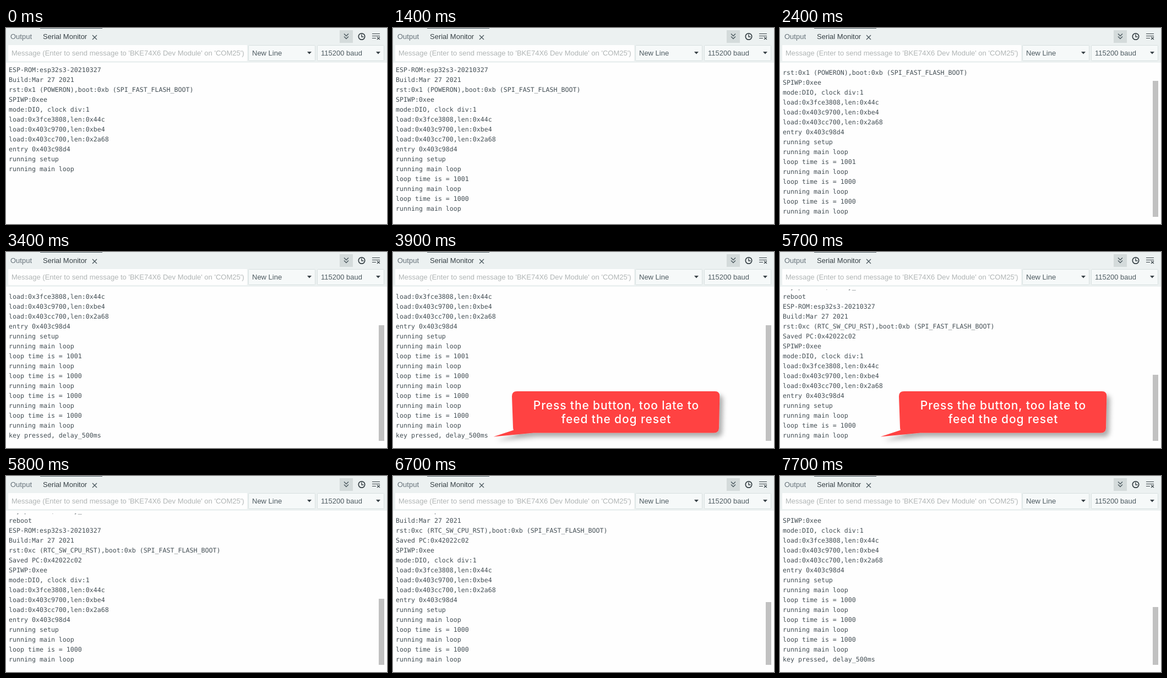
An HTML page for the animation above (8 s loop, 692 by 356 pixels).

```html
<!DOCTYPE html>
<html lang="en">
<head>
<meta charset="utf-8">
<title>Serial Monitor</title>
<style>
  html, body { margin: 0; width: 100%; height: 100%; overflow: hidden; background: #fefefe; }
  svg { display: block; width: 692px; height: 356px; }
  .ui { font: 13px "Liberation Sans", Arial, sans-serif; fill: #4e5b61; }
  .log { font: 11.627px "DejaVu Sans Mono", "Liberation Mono", monospace; fill: #444f55;
         text-rendering: geometricPrecision; white-space: pre; }
  .callout { font: 500 21px Inter, "Open Sans", sans-serif; letter-spacing: .88px;
             fill: #fff; text-anchor: middle; }
  .icon { fill: none; stroke: #4e5b61; stroke-width: 1.4; }
  .dark { stroke: #374146; }
</style>
</head>
<body>
<svg viewBox="0 0 692 356">
  <defs>
    <clipPath id="view"><rect x="0" y="68" width="692" height="275"/></clipPath>
    <filter id="shadow" x="-10%" y="-20%" width="125%" height="160%">
      <feDropShadow dx="6" dy="7" stdDeviation="4.5" flood-color="#000" flood-opacity=".32"/>
    </filter>
  </defs>

  <rect width="692" height="356" fill="#fefefe"/>
  <rect width="692" height="63" fill="#ecf1f1"/>

  <g class="ui">
    <rect x="62" width="113" height="1" fill="#4e5b61"/>
    <text x="8" y="20" fill="#66727a">Output</text>
    <text x="67" y="20" fill="#374146">Serial Monitor</text>
    <path class="icon" d="M157 13l8 8m0-8l-8 8"/>

    <rect x="606" y="4" width="24" height="23" fill="#d4dbdb"/>
    <path class="icon" d="M614 10.5l4 4 4-4M614 15.5l4 4 4-4"/>
    <circle class="icon dark" cx="646" cy="15.500" r="5.700" stroke-width="1.700" style="stroke-width:1.7"/>
    <path class="icon dark" d="M646 11.500v4.500h3.500"/>
    <path class="icon dark" d="M665 10.500h14M665 14.500h14M665 18.500h7M674 16.500l5 4.500m0-4.500l-5 4.500" style="stroke-width:1.1"/>

    <rect x="4" y="31" width="434" height="29" rx="1" fill="#fefefe"/>
    <text x="10" y="50" fill="#b0b5b5">Message (Enter to send message to 'BKE74X6 Dev Module' on 'COM25')</text>
    <g fill="#f6f9f9" stroke="#d8e0e0">
      <rect x="440.5" y="31.5" width="121" height="28" rx="1"/>
      <rect x="565.5" y="31.5" width="121" height="28" rx="1"/>
    </g>
    <text x="447" y="50">New Line</text>
    <text x="572" y="50">115200 baud</text>
    <path d="M547 43h8l-4 4.500zM672 43h8l-4 4.500z" fill="#3a4348"/>
  </g>

  <g clip-path="url(#view)"><g id="log" class="log"></g></g>
  <rect id="thumb" x="677" width="10" fill="#c1c1c1"/>

  <g id="callout">
    <path filter="url(#shadow)" fill="#ff4343"
      d="M225 253H585Q593.500 253 593.300 262L592 320Q591.500 328.500 583 328.500H255L182.500 335.500L219 323.500Q218 321 218 318L216 262Q216 253 225 253Z"/>
    <text class="callout" x="405.5" y="286">Press the button, too late to</text>
    <text class="callout" x="405.5" y="310.5">feed the dog reset</text>
  </g>
</svg>
<script>
const DURATION = 8000, LINE = 18, VIEW_TOP = 68, VIEW_HEIGHT = 275, FIRST_BASELINE = 80;
const RUN = "running main loop", KEY = "key pressed, delay_500ms";
const $ = id => document.getElementById(id);

const boot = (...reset) => [
  "ESP-ROM:esp32s3-20210327", "Build:Mar 27 2021", ...reset, "SPIWP:0xee",
  "mode:DIO, clock div:1", "load:0x3fce3808,len:0x44c", "load:0x403c9700,len:0xbe4",
  "load:0x403cc700,len:0x2a68", "entry 0x403c98d4", "running setup", RUN
];
const loops = (...times) => times.flatMap(ms => ["loop time is = " + ms, RUN]);

const lines = [
  ...boot("rst:0x1 (POWERON),boot:0xb (SPI_FAST_FLASH_BOOT)"),
  ...loops(1001, 1000, 1000, 1000), KEY, "reboot",
  ...boot("rst:0xc (RTC_SW_CPU_RST),boot:0xb (SPI_FAST_FLASH_BOOT)", "Saved PC:0x42022c02"),
  ...loops(1000, 1000, 1000), KEY
];

// [time in ms, number of lines printed so far]
const prints = [[0, 11], [300, 12], [400, 13], [1400, 15], [2400, 17], [3400, 20],
                [4600, 31], [4700, 33], [5700, 35], [6700, 37], [7700, 40]];

const rows = lines.map((line, i) => {
  const row = document.createElementNS("http://www.w3.org/2000/svg", "text");
  row.setAttribute("x", 5);
  row.setAttribute("y", FIRST_BASELINE + i * LINE);
  row.textContent = line;
  return $("log").appendChild(row);
});

const show = (node, visible) => node.setAttribute("visibility", visible ? "visible" : "hidden");

function render(time) {
  const count = prints.filter(([start]) => start <= time).pop()[1];
  const height = count * LINE;
  const scroll = Math.max(0, height - VIEW_HEIGHT);
  rows.forEach((row, i) => show(row, i < count));
  $("log").setAttribute("transform", `translate(0 ${-scroll})`);

  const thumbHeight = Math.round(VIEW_HEIGHT * VIEW_HEIGHT / height);
  show($("thumb"), scroll > 0);
  $("thumb").setAttribute("y", VIEW_TOP + VIEW_HEIGHT - thumbHeight);
  $("thumb").setAttribute("height", thumbHeight);

  show($("callout"), time >= 3900 && time < 5800);
}

const begin = performance.now();
function tick() {
  render((performance.now() - begin) % DURATION);
  requestAnimationFrame(tick);
}
tick();
</script>
</body>
</html>
```
